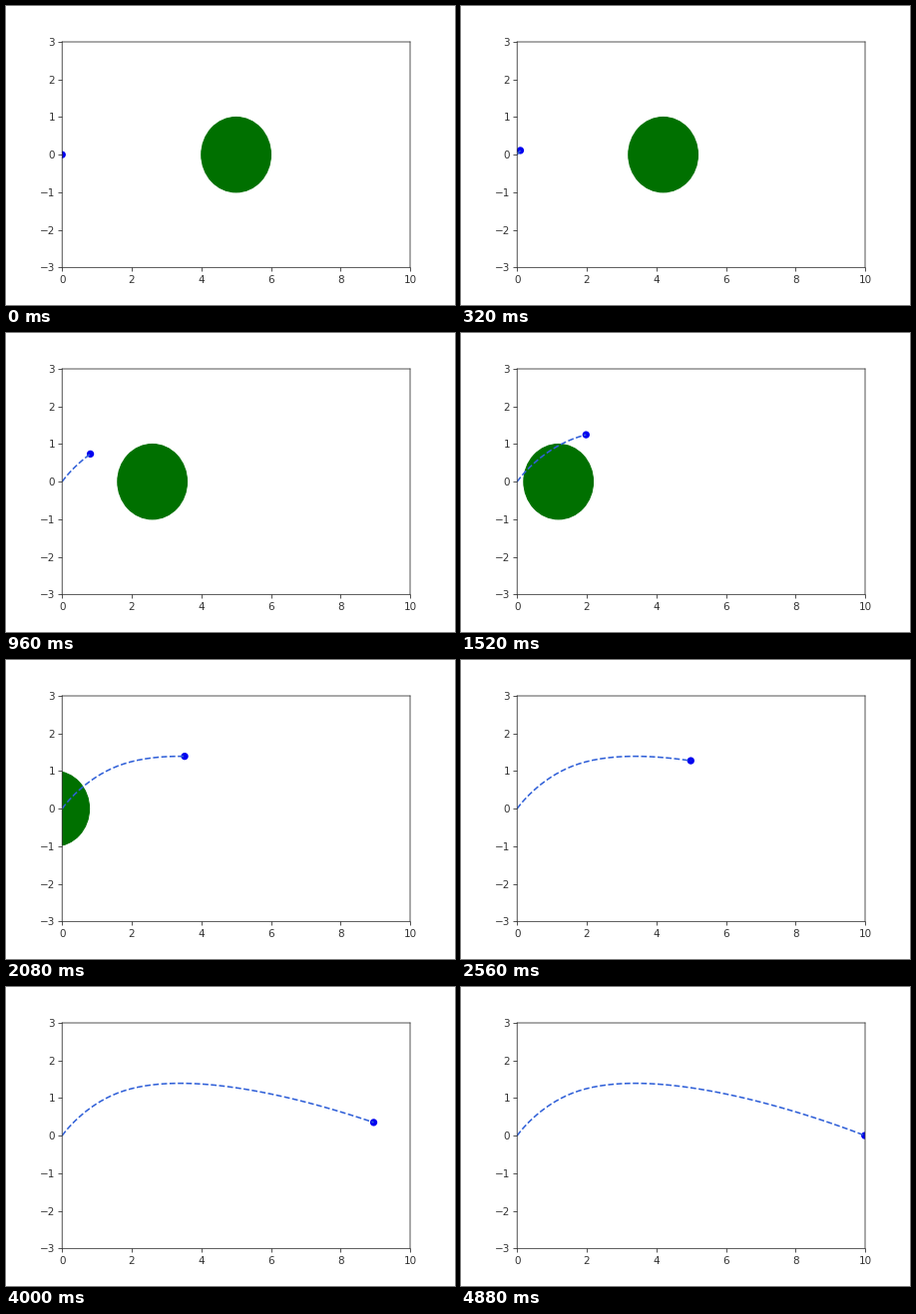
A matplotlib script that plays this animation: 450 px wide and 300 px high, repeating every 4.96 s.

```python
import numpy as np
import matplotlib.pyplot as plt
from matplotlib.animation import FuncAnimation
from matplotlib.patches import Circle, Ellipse

FRAMES, INTERVAL = 62, 80
PASS, END = 17, 62              # steps when the ball clears the disc and comes to rest
START = np.array([0.0, 0.0])
GOAL = np.array([10.0, 0.0])
PASS_POS = np.array([1.60, 1.136])
PASS_VEL = np.array([0.182, 0.0651])
REST = np.zeros(2)
DISC_SPEED = 0.2006
INK = "#333333"


def hermite(u, span, p0, v0, p1, v1):
    """Cubic from p0 to p1 with the given end velocities."""
    return ((2 * u**3 - 3 * u**2 + 1) * p0 + (u**3 - 2 * u**2 + u) * span * v0
            + (3 * u**2 - 2 * u**3) * p1 + (u**3 - u**2) * span * v1)


def ball_at(step):
    if step <= PASS:
        return hermite(step / PASS, PASS, START, REST, PASS_POS, PASS_VEL)
    span = END - PASS
    return hermite((step - PASS) / span, span, PASS_POS, PASS_VEL, GOAL, REST)


path = np.array([ball_at(step) for step in range(FRAMES)])

plt.rcParams.update({"font.family": "DejaVu Sans", "font.size": 10})
fig = plt.figure(figsize=(6, 4), dpi=75, facecolor="white")
ax = fig.add_axes([0.125, 0.1255, 0.775, 0.7545])
ax.set(xlim=(0, 10), ylim=(-3, 3),
       xticks=range(0, 11, 2), yticks=range(-3, 4))
ax.tick_params(color=INK, labelcolor=INK)
for spine in ax.spines.values():
    spine.set_edgecolor(INK)
    spine.set_snap(False)

disc = ax.add_patch(Circle((5, 0), 1, color="#007000"))
# An ellipse in data units is round on screen and moves by parts of a pixel
ball = ax.add_patch(Ellipse((0, 0), 0.209, 0.193, color="#0000f0",
                            linewidth=0, zorder=1.5))
trail, = ax.plot([], [], "--", color="#3060d8", linewidth=1.5)


def draw(step):
    disc.center = (5 - DISC_SPEED * step, 0)
    ball.center = path[step]
    trail.set_data(path[:step + 1, 0], path[:step + 1, 1])
    return disc, ball, trail


anim = FuncAnimation(fig, draw, frames=FRAMES, interval=INTERVAL,
                     init_func=lambda: draw(0), repeat=True, repeat_delay=0)
plt.show()
```
